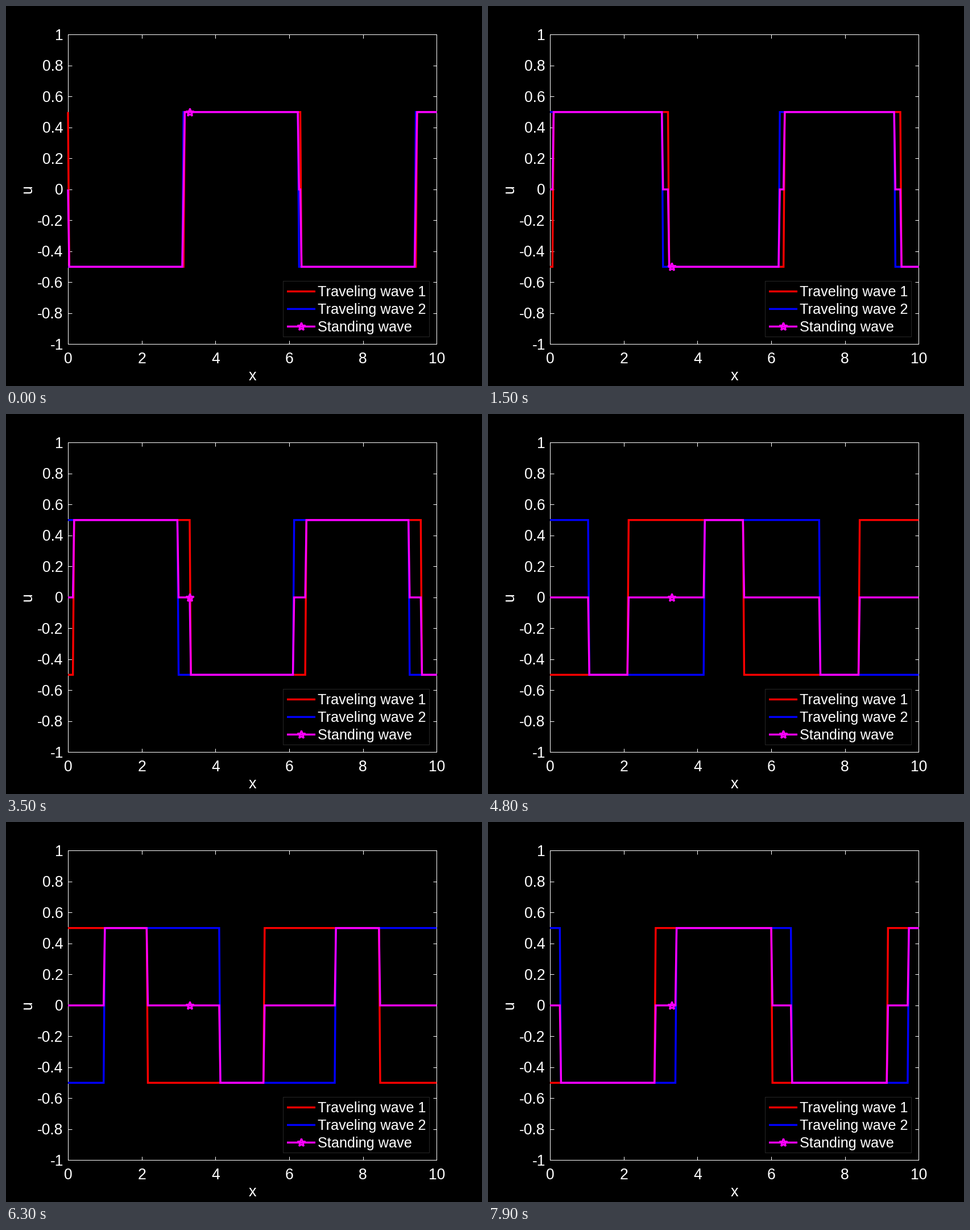
Recreate the animation shown at these times as a matplotlib script. Size 837 by 669 pixels, loop 8 s.

```python
import numpy as np
import matplotlib.pyplot as plt
from matplotlib.animation import FuncAnimation
from matplotlib.lines import Line2D
from matplotlib.patches import Rectangle

W, H, DPI = 837, 669, 64
PT = 72 / DPI  # points per pixel
L, R, T, B = 109, 757.4, 50.4, 595.4
FRAMES, STEP_MS = 80, 100
START, STEP = 5, 0.63245  # first step index, phase per step
LINE, TICK_FONT, LEGEND_FONT, LABEL_FONT = 3.4, 26.5, 25.3, 27
RED, BLUE, MAGENTA = "#ff0000", "#0000ff", "#ff00ff"

plt.rcParams["font.family"] = "Liberation Sans"
plt.rcParams["axes.unicode_minus"] = False

fig = plt.figure(figsize=(W / DPI, H / DPI), dpi=DPI, facecolor="black")
ax = fig.add_axes([L / W, 1 - B / H, (R - L) / W, (B - T) / H], facecolor="black")
ax.set(xlim=(0, 10), ylim=(-1, 1))
ax.set_xticks(range(0, 11, 2))
ax.set_yticks(np.linspace(-1, 1, 11))
ax.tick_params(direction="in", length=6.5 * PT, width=PT, color="white",
               top=True, right=True, labelbottom=False, labelleft=False)
for spine in ax.spines.values():
    spine.set(color="white", linewidth=PT)

# Overlay with pixel coordinates, y pointing down
page = fig.add_axes([0, 0, 1, 1])
page.set(xlim=(0, W), ylim=(H, 0))
page.axis("off")


def label(x, y, s, size, **kw):
    page.text(x, y, s, fontsize=size * PT, color="white", **kw)


def advance(s):
    widths = {".": 0.278, "-": 0.333}
    return TICK_FONT * sum(widths.get(c, 0.556) for c in s)


def stroke(color):
    return dict(color=color, lw=LINE * PT, solid_capstyle="butt",
                solid_joinstyle="miter", snap=False, clip_on=False)


def star():
    return dict(marker="*", ms=15 * PT, mfc="none", mec=MAGENTA, mew=2.9 * PT,
                ls="none", clip_on=False)


for v in ax.get_xticks():
    s = f"{v:g}"
    label(L + v * (R - L) / 10 - advance(s) / 2, 628.7, s, TICK_FONT)
for k in range(-5, 6):
    s = f"{k / 5:g}"
    label(101 - advance(s), (T + B) / 2 - k * (B - T) / 10 + 9.4, s, TICK_FONT)
label(433, 652, "x", LABEL_FONT, ha="center", va="center")
label(38, 323, "u", LABEL_FONT, ha="center", va="center", rotation=90)

page.add_patch(Rectangle((487, 484), 257, 98, fc="black", ec="#262626", lw=PT))
entries = [("Traveling wave 1", RED), ("Traveling wave 2", BLUE), ("Standing wave", MAGENTA)]
for i, (name, color) in enumerate(entries):
    y = 502.5 + 30.9 * i
    page.add_line(Line2D([494, 544], [y, y], **stroke(color)))
    label(548.5, y + 8.8, name, LEGEND_FONT)
page.plot([519], [564.3], **star())

x = np.linspace(0, 10, 301)
MARK = 99
red, blue, mix = (ax.plot(x, 0 * x, **stroke(c))[0] for c in (RED, BLUE, MAGENTA))
for z, line in enumerate((red, blue, mix)):
    line.set_zorder(5 + z)
point, = ax.plot([x[MARK]], [0], zorder=9, **star())


def square(phase):
    return 0.5 * np.sign(np.sin(phase))


def draw(i):
    shift = STEP * (START + i)
    right, left = square(x - shift), square(x + shift)
    total = (right + left) / 2
    red.set_ydata(right)
    blue.set_ydata(left)
    mix.set_ydata(total)
    point.set_ydata([total[MARK]])
    return red, blue, mix, point


anim = FuncAnimation(fig, draw, frames=FRAMES, interval=STEP_MS,
                     repeat=True, repeat_delay=0, blit=False)
plt.show()
```
